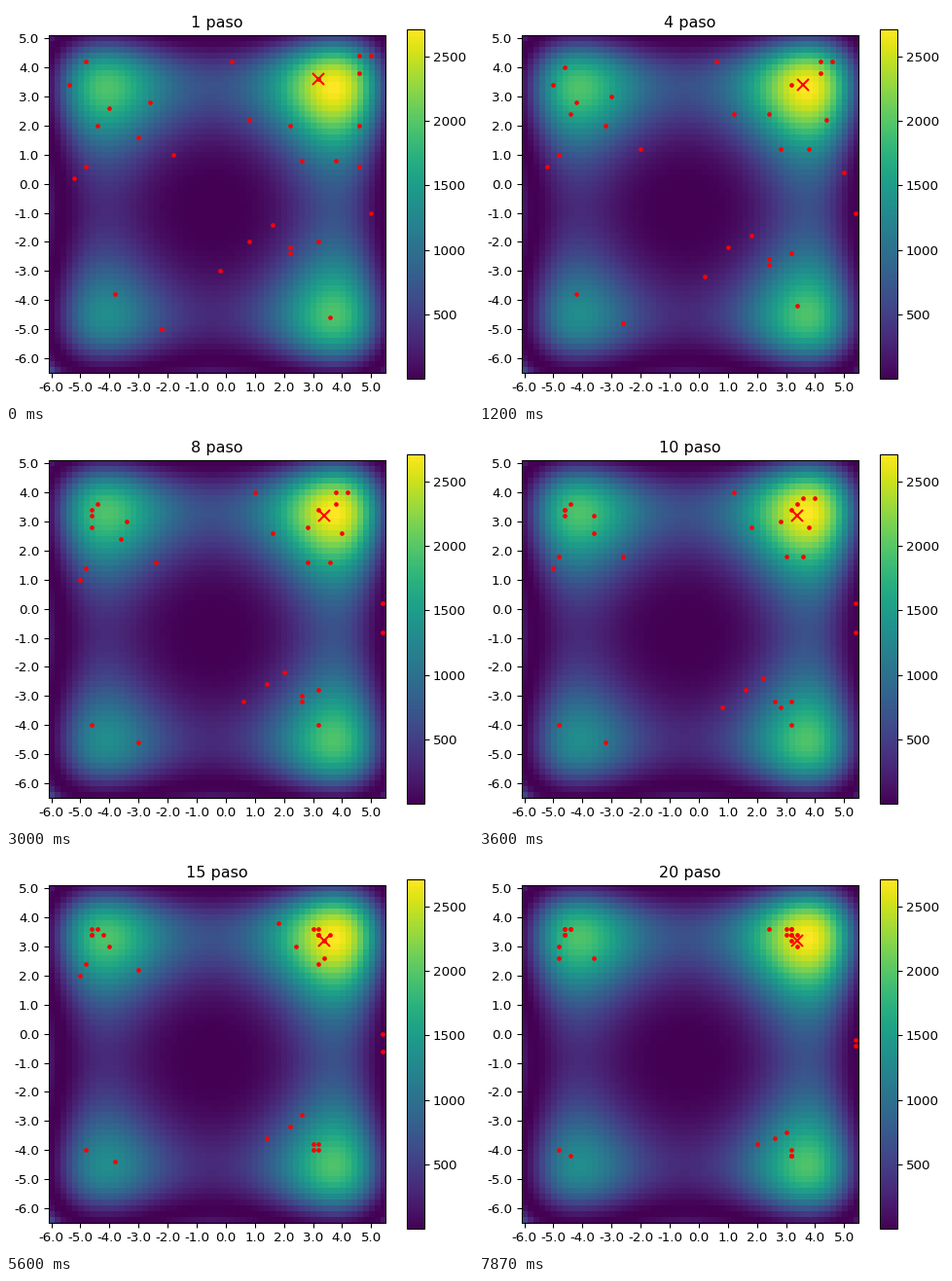
A matplotlib script that plays this animation: 480 px wide and 408 px high, repeating every 8000 ms.

```python
import numpy as np
import matplotlib.pyplot as plt
from matplotlib.animation import FuncAnimation

W, H, DPI = 480, 408, 96
STEPS, STEP_MS = 20, 400
CELL = 0.2
SPEED = 0.125
X_MAX = 5.4

# Four hilltops, and a rise beyond the right edge of the map.
GOALS = np.array([(-4.5, 3.5), (3.2, 3.5), (-4.6, -4.1), (3.2, -4.1),
                  (7.6, -0.4)])
START = np.array([
    (-5.4, 3.4), (-4.8, 4.2), (-4.0, 2.6), (-4.4, 2.0), (-2.6, 2.8),
    (-3.0, 1.6), (-1.8, 1.0), (-4.8, 0.6), (-5.2, 0.2), (0.2, 4.2),
    (0.8, 2.2), (2.2, 2.0), (2.6, 0.8), (3.8, 0.8), (4.6, 0.6),
    (4.6, 2.0), (4.6, 3.8), (4.6, 4.4), (5.0, 4.4), (3.2, 3.6),
    (5.0, -1.0), (3.2, -2.0), (2.2, -2.2), (2.2, -2.4), (1.6, -1.4),
    (0.8, -2.0), (-0.2, -3.0), (3.6, -4.6), (-3.8, -3.8), (-2.2, -5.0),
])

# Everyone heads for the nearest goal and stops at a random spot close to it.
gaps = np.linalg.norm(START[:, None] - GOALS, axis=2)
jitter = np.random.default_rng(4).normal(0, 0.12, START.shape)
route = GOALS[gaps.argmin(axis=1)] + jitter - START
length = np.linalg.norm(route, axis=1, keepdims=True)


def swarm(step):
    travelled = np.minimum(SPEED * (step - 1) / length, 1)
    pos = np.round((START + route * travelled) / CELL) * CELL
    pos[:, 0] = np.minimum(pos[:, 0], X_MAX)
    return pos


def best(step):
    if step < 3:
        return 3.2, 3.6
    return (3.6, 3.4) if step < 5 else (3.4, 3.2)


def well(t):
    return 0.0952 * (t**4 - 30.5 * t**2 - 10.5 * t)


def add_axes(left, top, right, bottom):
    return fig.add_axes([left / W, 1 - bottom / H,
                         (right - left) / W, (bottom - top) / H])


fig = plt.figure(figsize=(W / DPI, H / DPI), dpi=DPI, facecolor="white")
ax = add_axes(43.6, 30.4, 390.2, 376.8)
cax = add_axes(411.8, 24, 429.7, 383)

x = -6 + CELL * np.arange(58)
y = 5 - CELL * np.arange(58)
height = (well(x + 0.3) + well(y[:, None] + 0.7)) ** 2
image = ax.imshow(height, cmap="viridis", interpolation="nearest",
                  extent=(-6.1, 5.5, -6.5, 5.1), aspect="auto")
fig.colorbar(image, cax=cax)

ticks = np.arange(-6, 6)
labels = [f"{t:.1f}" for t in ticks]
ax.set_xticks(ticks, labels)
ax.set_yticks(ticks, labels)
ax.set_autoscale_on(False)

dots, = ax.plot([], [], "r.", markersize=5)
cross, = ax.plot([], [], "rx", markersize=8.8, markeredgewidth=1.5)
title = ax.set_title("")


def draw(frame):
    step = frame + 1
    dots.set_data(*swarm(step).T)
    bx, by = best(step)
    cross.set_data([bx], [by])
    title.set_text(f"{step} paso")
    return dots, cross, title


anim = FuncAnimation(fig, draw, frames=STEPS, interval=STEP_MS,
                     repeat=True, repeat_delay=0, blit=False)
plt.show()
```
